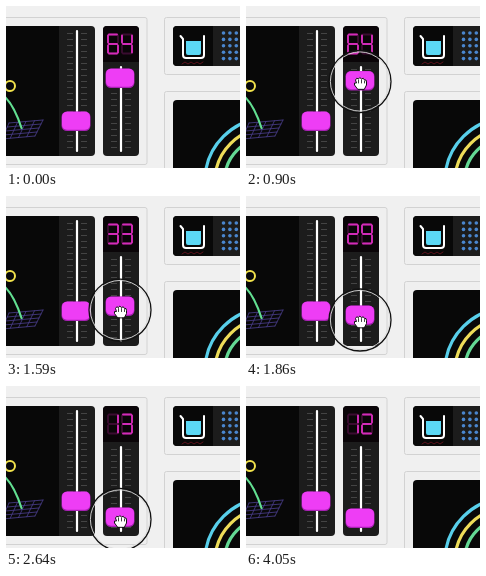
Recreate the animation shown at these times as an HTML page. Size 234x162 px, loop 4350 ms.

```html
<!DOCTYPE html>
<html lang="en">
<head>
<meta charset="utf-8">
<title>Slider drag</title>
<style>
  html, body { margin: 0; width: 100%; height: 100%; overflow: hidden; background: #f0f0f0; }
  svg { display: block; width: 100vw; height: 100vh; }
  .panel { fill: #efefef; stroke: #d2d2d2; }
  .line { fill: none; stroke-linecap: round; stroke-linejoin: round; }
</style>
</head>
<body>
<svg viewBox="0 0 234 162" preserveAspectRatio="none">
  <defs>
    <g id="knob">
      <rect x="-14.5" y="-9.5" width="29" height="19.5" rx="5.5" fill="#a820b4"/>
      <rect x="-14" y="-9.3" width="28" height="18" rx="5" fill="#ee3df5"/>
    </g>
  </defs>
  <rect width="234" height="162" fill="#f0f0f0"/>
  <rect class="panel" x="-10" y="11.5" width="151" height="147" rx="2"/>
  <rect class="panel" x="158.5" y="11.5" width="90" height="57" rx="2"/>
  <rect class="panel" x="158.5" y="85.5" width="90" height="90" rx="2"/>

  <!-- Scene and left slider -->
  <rect x="-10" y="20" width="99" height="130" rx="4" fill="#1c1c1c"/>
  <rect x="-10" y="20" width="63" height="130" fill="#080808"/>
  <g id="grid" class="line" stroke="#4c3f90" stroke-width=".8"></g>
  <path d="M-2 90Q8 99 15.5 122" class="line" stroke="#62df91" stroke-width="2.2"/>
  <circle cx="4" cy="80" r="5" class="line" stroke="#f2e34c" stroke-width="2"/>

  <!-- Right slider -->
  <rect x="97" y="20" width="36" height="130" rx="4" fill="#1c1c1c"/>
  <path d="M97 56V24q0-4 4-4h28q4 0 4 4v32z" fill="#0a0508"/>
  <g id="ticks" stroke="#444"></g>
  <path d="M71 25V145M115 61V145" class="line" stroke="#fff" stroke-width="2.2"/>
  <use href="#knob" x="70" y="115"/>
  <path id="unlit" class="line" stroke="#3a0c30" stroke-width="1.9"/>
  <path id="digits" class="line" stroke="#d32bb8" stroke-width="1.9"/>
  <use href="#knob" id="handle"/>

  <!-- Icon tiles -->
  <rect x="167" y="20" width="80" height="40" rx="4" fill="#1c1c1c"/>
  <path d="M207 20H171q-4 0-4 4v32q0 4 4 4h36z" fill="#080808"/>
  <path d="M180 35H195V47q0 2-2 2H182q-2 0-2-2z" fill="#5bd8f5"/>
  <path d="M174.5 30L177 33V49q0 3 3 3H195q3 0 3-3V30" class="line" stroke="#fff" stroke-width="2"/>
  <path d="M176 58l3-2 3 2 3-2 3 2 3-2 3 2 3-2" class="line" stroke="#5c121c"/>
  <g id="dots" fill="#4a86cf"></g>

  <!-- Arcs -->
  <rect x="167" y="94" width="80" height="80" rx="4" fill="#080808"/>
  <g class="line" stroke-width="3.2">
    <circle cx="262" cy="175" r="63" stroke="#58cfea"/>
    <circle cx="262" cy="175" r="53" stroke="#eddd58"/>
    <circle cx="262" cy="175" r="43.5" stroke="#63d994"/>
  </g>

  <g id="cursor">
    <circle class="ring line" stroke="#111" stroke-width="1.3"/>
    <circle class="ring line" stroke="#ddd" stroke-width=".9"/>
    <g transform="translate(.5 1.5)">
      <path d="M-3 6L-6 2Q-7-1-4 0L-5-3Q-4-6-2-4Q-1-7 1-4Q3-6 4-3Q6-4 6-1V2L4 6z"
        class="line" style="fill:#fff" stroke="#111"/>
      <path d="M-2-3V0M1-3V0M4-2V0" class="line" stroke="#111" stroke-width=".8"/>
    </g>
  </g>
</svg>
<script>
const LOOP = 4350;
const $ = id => document.getElementById(id);

// [time, position]
const cursorKeys = [[600, 74], [900, 75.5], [1200, 89.5], [1590, 114], [1860, 124], [2640, 133.5], [3300, 134.5]];
const handleKeys = [[600, 72], [900, 74.5], [1200, 85], [1590, 110], [1860, 119], [2640, 131], [3300, 132]];
const valueKeys = [[900, 64], [1200, 59], [1590, 33], [1860, 29], [2640, 13], [3300, 12]];

const clamp = x => Math.max(0, Math.min(1, x));
const smooth = x => x * x * (3 - 2 * x);

// Monotone cubic through the keys, level at both ends.
function track(keys, t) {
  const last = keys.length - 1;
  if (t <= keys[0][0]) return keys[0][1];
  if (t >= keys[last][0]) return keys[last][1];
  const slope = i => (keys[i + 1][1] - keys[i][1]) / (keys[i + 1][0] - keys[i][0]);
  const tangent = i => {
    if (i === 0 || i === last) return 0;
    const a = slope(i - 1), b = slope(i);
    return a * b > 0 ? 2 * a * b / (a + b) : 0;
  };
  const i = keys.findIndex(k => k[0] > t) - 1;
  const [t0, y0] = keys[i], [t1, y1] = keys[i + 1];
  const u = (t - t0) / (t1 - t0), h = t1 - t0;
  return y0 + (y1 - y0) * smooth(u)
    + h * u * (1 - u) * (tangent(i) * (1 - u) - tangent(i + 1) * u);
}

// Segments a to g of one seven-segment digit: start x, y and the stroke from there.
const segments = {
  a: [1, 0, 'h8'], b: [10, 1, 'v7'], c: [10, 11, 'v7'], d: [1, 19, 'h8'],
  e: [0, 11, 'v7'], f: [0, 1, 'v7'], g: [1, 9.5, 'h8']
};
const lit = ['abcdef', 'bc', 'abdeg', 'abcdg', 'bcfg', 'acdfg', 'acdefg', 'abc', 'abcdefg', 'abcdfg'];

function numberPath(value) {
  const digitPath = (digit, left) => [...lit[digit]].map(name => {
    const [x, y, stroke] = segments[name];
    return `M${left + x} ${28.5 + y}${stroke}`;
  }).join('');
  return digitPath(Math.floor(value / 10), 102) + digitPath(value % 10, 116);
}

function buildStatics() {
  let ticks = '';
  for (const [x, top] of [[71, 27], [115, 63]])
    for (let y = top; y < 146; y += 6)
      ticks += `M${x - 10} ${y}.5h6M${x + 4} ${y}.5h6`;
  $('ticks').innerHTML = `<path d="${ticks}"/>`;

  let grid = '';
  for (let i = 0; i <= 4; i++) {
    const u = i / 4;
    grid += `M${3 - 7 * u} ${117 + 16 * u}L${37 - 8 * u} ${114 + 16 * u}`;
    grid += `M${3 + 34 * u} ${117 - 3 * u}L${-4 + 33 * u} ${133 - 3 * u}`;
  }
  $('grid').innerHTML = `<path d="${grid}"/>`;

  let dots = '';
  for (let x = 217.5; x < 238; x += 6.4)
    for (let y = 27; y < 54; y += 6.4)
      dots += `<circle cx="${x}" cy="${y}" r="1.8"/>`;
  $('dots').innerHTML = dots;

  $('unlit').setAttribute('d', numberPath(88));
}

const [outer, inner] = document.querySelectorAll('.ring');

function draw(t) {
  $('digits').setAttribute('d', numberPath(Math.round(track(valueKeys, t))));
  $('handle').setAttribute('transform', `translate(114 ${track(handleKeys, t)})`);

  const shown = smooth(clamp(t / 480)) * (1 - smooth(clamp((t - 3430) / 350)));
  const radius = 31 + 25 * (1 - shown);
  outer.setAttribute('r', radius);
  inner.setAttribute('r', radius - 1.4);
  $('cursor').setAttribute('opacity', shown);
  $('cursor').setAttribute('transform', `translate(114 ${track(cursorKeys, t)})`);
}

buildStatics();
const start = performance.now();
function frame() {
  draw((performance.now() - start) % LOOP);
  requestAnimationFrame(frame);
}
frame();
</script>
</body>
</html>
```
